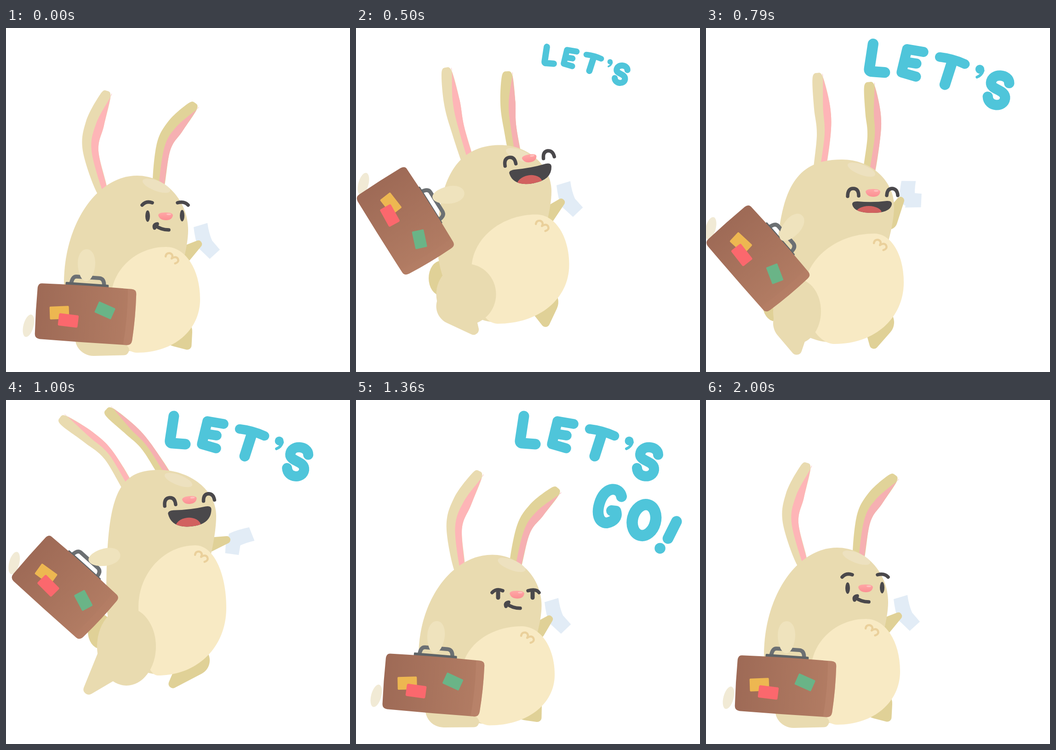
An HTML page for the animation above (2140 ms loop, 748 px wide and 748 px high).

```html
<!DOCTYPE html>
<html lang="en">
<head>
<meta charset="utf-8">
<title>Let's go!</title>
<style>
  html, body { margin: 0; width: 100%; height: 100%; overflow: hidden; background: #fff; }
  svg { display: block; width: 100vw; height: 100vh; }
  .line { fill: none; stroke: #4a484b; stroke-width: 7.5; stroke-linecap: round; stroke-linejoin: round; }
  .word { fill: none; stroke: #4fc5da; stroke-width: 23; stroke-linecap: round; stroke-linejoin: round; }
  .fur { fill: #e9dbb0; }
  .shade { fill: #e0d197; }
</style>
</head>
<body>
<svg viewBox="0 0 748 748" role="img" aria-label="Let's go!">
  <defs>
    <linearGradient id="leather"><stop stop-color="#9e6a56"/><stop offset="1" stop-color="#b37d64"/></linearGradient>
    <linearGradient id="snout" x2="0" y2="1"><stop stop-color="#ffa8a6"/><stop offset="1" stop-color="#fb8f93"/></linearGradient>
    <clipPath id="inMouth"><path id="mouthClip"/></clipPath>
  </defs>

  <g id="rabbit">
    <ellipse id="sock" rx="11" ry="25" fill="#f1ead5"/>
    <ellipse id="tail" class="shade" rx="27" ry="38"/>
    <path id="farLeg" class="shade"/>
    <g id="paper" fill="#e2ecf6">
      <path id="upperFlap" d="M-10 -37L20 -46Q23 -24 30 -8L14 12L0 8Q-7 -10 -10 -37Z"/>
      <path id="lowerFlap" d="M0 8L29 -9L47 12L25 32Z"/>
    </g>
    <path id="farArm" class="shade"/>
    <path id="farEar" fill="#e1d399"/><path id="farPink" fill="#f6b0b2"/>
    <path id="nearEar" class="fur"/><path id="nearPink" fill="#feb5b7"/>
    <path id="body" class="fur"/>
    <ellipse id="shine" rx="32" ry="11" fill="#f0e5c8" opacity=".65"/>
    <path id="belly" fill="#f8eac4"/>
    <path id="tuft" class="line" style="stroke:#ead09b;stroke-width:4.5"
      d="M-13 -6Q-10 -14 -2 -11Q5 -6 -1 1Q9 -3 12 4Q14 12 4 13"/>
    <ellipse id="thigh" class="fur"/>
    <path id="nearLeg" class="fur"/>

    <g id="face">
      <g id="open">
        <path class="line" d="M-51 -24Q-42 -34 -29 -29M26 -29Q41 -33 49 -24"/>
        <g fill="#4a484b"><ellipse cx="-39" rx="5" ry="12.5"/><ellipse cx="36" cy="-1" rx="5" ry="12.5"/></g>
      </g>
      <g id="half">
        <path class="line" d="M-54 -4Q-45 -14 -31 -8M24 -8Q42 -13 48 -4"/>
        <path class="line" style="stroke-width:9" d="M-41 -4V7M34 -4V7"/>
      </g>
      <path id="shut" class="line" d="M-52 -14Q-53 4 -39 4Q-26 4 -26 -13M27 -4Q27 13 39 13Q52 13 52 -1"/>
      <path id="happy" class="line" d="M-55 8Q-55 -9 -43 -9Q-31 -9 -31 7M30 6Q31 -9 42 -9Q53 -8 54 6"/>
      <path id="smile" class="line" d="M-24 26Q-27 18 -18 17M-23 20Q-10 30 7 30"/>
      <g id="laugh">
        <path id="mouth" fill="#4a484b"/>
        <ellipse id="tongue" cx="-9" rx="28" fill="#d1615f" clip-path="url(#inMouth)"/>
      </g>
      <path fill="url(#snout)" d="M-16 -2Q-15 -8 0 -8Q15 -8 16 -2Q14 9 1 9Q-13 9 -16 -2Z"/>
      <ellipse cx="7" cy="-4" rx="5" ry="1.8" fill="#ffc0be"/>
    </g>

    <g id="suitcase">
      <path fill="none" stroke="#6c7073" stroke-width="8.5" d="M-36 -62Q-35 -80 -25 -80H24Q36 -80 36 -62"/>
      <rect x="-48" y="-67" width="94" height="8" rx="2" fill="#5f6467"/>
      <g id="shell">
        <path fill="url(#leather)" d="M-99 -60Q0 -63 96 -61Q107 -61 107 -50Q109 0 105 50Q104 61 94 61Q0 62 -96 61Q-107 60 -107 50Q-109 0 -108 -50Q-107 -60 -99 -60Z"/>
        <path id="strip" fill="#c08a70" d="M88 -61H96Q107 -61 107 -50Q109 0 105 50Q104 61 94 61H86Q92 0 88 -61Z"/>
      </g>
      <g id="stickers">
        <rect x="-78" y="-13" width="42" height="28" rx="2" fill="#edb751" transform="rotate(-6 -57 1)"/>
        <rect x="-58" y="3" width="43" height="27" rx="3" fill="#fb686d" transform="rotate(3 -36 16)"/>
        <rect x="22" y="-24" width="39" height="26" rx="2" fill="#6ab487" transform="rotate(20 41 -11)"/>
      </g>
    </g>
    <path id="arm" fill="#efe3bd" d="M0 -35C13 -35 19 -19 19 -5C19 14 11 35 0 35S-19 14 -19 -5C-19 -19 -13 -35 0 -35Z"/>
  </g>

  <g id="lets" class="word">
    <path d="M365 35L357 88Q356 94 363 94L390 96"/>
    <path d="M473 52L438 46L426 96L457 105M432 73L458 77" stroke-width="21.5"/>
    <path d="M508 63Q535 66 562 78" stroke-width="20.5"/><path d="M535 72L519 122"/>
    <path d="M594 89v.1" stroke-width="19"/><path d="M601 92Q598 102 588 106" stroke-width="6"/>
    <path d="M657 119C657 99 620 96 618 118C617 134 650 132 648 152C645 172 612 170 611 148" stroke-width="22"/>
  </g>
  <g id="go" class="word">
    <path d="M578 211C574 190 545 188 533 220C522 250 532 268 547 267C562 264 570 255 566 242L557 241"/>
    <ellipse cx="626" cy="261" rx="24.5" ry="33.5" stroke-width="24" transform="rotate(15 626 261)"/>
    <path d="M695 264L677 300"/><path d="M660 321v.1"/>
  </g>
</svg>

<script>
const FPS = 14, LOOP = 2140;
const $ = id => document.getElementById(id);

// head, belly: extreme points of the outline (top, right, bottom, left).
// ears: bend x y, lower angle, upper angle. legs: joint and toe. farArm: shoulder and hand.
const poses = {
  rest: {
    head: [285, 321, 396, 440, 126, 555], belly: [348, 476, 422, 590, 285, 706, 228, 590], square: [.55],
    nearEar: [184, 267, -16, 15], farEar: [342, 261, 7, 35], earWidth: [1],
    thigh: [200, 647, 50, 50], toe: [256, 700], farLeg: [372, 660, 394, 690], tail: [170, 640],
    farArm: [386, 493, 418, 470], flaps: [0, 0],
    arm: [175, 516, 1], suitcase: [173, 622, 4, 1], face: [347, 409, 0, 44]
  },
  squat: {
    head: [308, 352, 411, 455, 146, 560], belly: [372, 508, 442, 605, 295, 709, 232, 600], square: [.55],
    nearEar: [243, 289, 1, 32], farEar: [384, 308, 17, 43], earWidth: [1],
    thigh: [219, 645, 68, 57], toe: [256, 700], farLeg: [370, 667, 394, 691], tail: [170, 630],
    farArm: [400, 512, 422, 483], flaps: [0, -3],
    arm: [155, 511, 64], suitcase: [136, 602, 10.4, 1], face: [359, 464, 0, 44]
  },
  leap: {
    head: [320, 177, 439, 276, 208, 400], belly: [412, 323, 485, 445, 320, 597, 270, 470], square: [.8],
    nearEar: [199, 168, -36, -54], farEar: [285, 140, -38, -49], earWidth: [.74],
    thigh: [260, 533, 62, 76], toe: [255, 631], farLeg: [444, 545, 430, 610], tail: [200, 478],
    farArm: [428, 326, 470, 295], flaps: [0, 0],
    arm: [204, 364, 82], suitcase: [103, 406, 64.7, .955], face: [383, 236, -13, 59]
  },
  land: {
    head: [296, 286, 409, 388, 152, 570], belly: [366, 447, 430, 553, 280, 687, 213, 575], square: [.75],
    nearEar: [256, 232, 7, -6], farEar: [365, 237, 8, -5], earWidth: [.88],
    thigh: [198, 616, 52, 70], toe: [197, 699], farLeg: [376, 640, 365, 688], tail: [150, 600],
    farArm: [398, 420, 423, 375], flaps: [17, -45],
    arm: [186, 434, 40], suitcase: [113, 502, 49, .965], face: [363, 358, 0, 44]
  },
  hop: {
    head: [333, 152, 457, 252, 218, 430], belly: [412, 316, 479, 452, 330, 599, 288, 450], square: [.8],
    nearEar: [224, 121, -31, -52], farEar: [306, 102, -33, -47], earWidth: [.72],
    thigh: [262, 536, 64, 85], toe: [180, 629], farLeg: [410, 566, 363, 617], tail: [205, 503],
    farArm: [430, 318, 480, 304], flaps: [85, 50],
    arm: [214, 342, 79], suitcase: [128, 408, 42, .965], face: [399, 217, -6, 58]
  }
};

// Step, pose, lift above it.
const keys = [
  [0, 'rest', 0], [2, 'rest', 0], [5, 'squat', 0], [6, 'squat', 0], [8, 'leap', 20], [9, 'leap', 0],
  [11, 'land', 0], [13, 'hop', 6], [14, 'hop', 0], [16, 'land', 0], [17, 'squat', 0], [21, 'rest', 0], [30, 'rest', 0]
];
const eyeKeys = [[0, 'open'], [4, 'half'], [5, 'shut'], [7, 'happy'], [18, 'shut'], [19, 'half'], [21, 'open']];

const lerp = (a, b, t) => a + (b - a) * t;
const smooth = t => t * t * (3 - 2 * t);
const easeOut = power => t => 1 - (1 - t) ** power;
const easing = { face: easeOut(2), suitcase: easeOut(3), arm: easeOut(4) };
const rad = degrees => degrees * Math.PI / 180;
const set = (id, attrs) => { for (const name in attrs) $(id).setAttribute(name, attrs[name]); };
const show = (id, on) => set(id, { display: on ? 'inline' : 'none' });
const place = (id, x, y, angle) => set(id, { transform: `translate(${x} ${y}) rotate(${angle})` });

// Closed curve through four extreme points; tension is given per quarter, clockwise from the top.
function oval([tx, ty, rx, ry, bx, by, lx, ly], [tr, rb, bl, lt]) {
  return `M${tx} ${ty}C${lerp(tx, rx, tr)} ${ty} ${rx} ${lerp(ry, ty, tr)} ${rx} ${ry}`
    + `C${rx} ${lerp(ry, by, rb)} ${lerp(bx, rx, rb)} ${by} ${bx} ${by}`
    + `C${lerp(bx, lx, bl)} ${by} ${lx} ${lerp(ly, by, bl)} ${lx} ${ly}`
    + `C${lx} ${lerp(ly, ty, lt)} ${lerp(tx, lx, lt)} ${ty} ${tx} ${ty}Z`;
}

// Hull of a big and a small circle.
function limb([x0, y0, x1, y1], big, small) {
  const along = Math.atan2(y1 - y0, x1 - x0);
  const spread = Math.acos(Math.min(1, (big - small) / Math.hypot(x1 - x0, y1 - y0)));
  const on = (x, y, r, side) => {
    const angle = along + side * spread;
    return `${x + r * Math.cos(angle)} ${y + r * Math.sin(angle)}`;
  };
  return `M${on(x0, y0, big, -1)}L${on(x1, y1, small, -1)}A${small} ${small} 0 0 1 ${on(x1, y1, small, 1)}`
    + `L${on(x0, y0, big, 1)}A${big} ${big} 0 1 1 ${on(x0, y0, big, -1)}Z`;
}

// Closed smooth curve; a doubled point makes a corner.
function blob(points) {
  const n = points.length, at = i => points[(i + n) % n];
  const handle = (i, side) => [0, 1].map(axis => at(i)[axis] + side * (at(i + 1)[axis] - at(i - 1)[axis]) / 6);
  return `M${points[0]}` + points.map((_, i) => `C${handle(i, 1)} ${handle(i + 1, -1)} ${at(i + 1)}`).join('') + 'Z';
}

function drawEar(side, [x, y, lower, upper], width, length) {
  const bulge = (lower - upper) * .2;
  const station = (angle, distance, half, shift = 0) => edge => {
    const across = shift + edge * half, a = rad(angle);
    return [x + distance * Math.sin(a) + across * Math.cos(a), y - distance * Math.cos(a) + across * Math.sin(a)];
  };
  const stations = [
    station(lower, -95, 11), station((lower + upper) / 2, 0, 17 * width),
    station(upper, length * .44, 20 * width, bulge), station(upper, length * .92, 11.5)
  ];
  const left = stations.map(at => at(-1)), right = stations.map(at => at(1)).reverse();
  const inner = stations.slice(0, 3).map(at => at(.12));
  set(side + 'Ear', { d: blob([...left, station(upper, length, 0)(0), ...right]) });
  set(side + 'Pink', { d: blob([...inner, right[0], ...right]) });
}

function poseAt(step) {
  const next = keys.findIndex(key => key[0] > step);
  const [[from, a, liftA], [to, b, liftB]] = [keys[next - 1], keys[next]];
  const t = (step - from) / (to - from), pose = {};
  for (const part in poses[a]) {
    const eased = (easing[part] || smooth)(t);
    pose[part] = poses[a][part].map((v, i) => lerp(v, poses[b][part][i], eased));
  }
  return { pose, lift: lerp(liftA, liftB, smooth(t)) };
}

function drawBody({ head, belly, square, thigh, toe, farLeg, tail }) {
  const [topX, topY, rightX, rightY, leftX, leftY] = head, [bellyX, bellyY, , , bottomX, bottomY] = belly;
  set('body', { d: oval([topX, topY, rightX, rightY, bottomX, bottomY - 3, leftX, leftY], [.55, .3, .55, square[0]]) });
  set('belly', { d: oval(belly, [.57, .58, .55, .55]) });
  place('shine', topX + 42, topY + 22, 21);
  place('tuft', bellyX + 13, bellyY + 24, -12);
  const [cx, cy, rx, ry] = thigh;
  set('thigh', { cx, cy, rx, ry });
  set('nearLeg', { d: limb([cx - rx + 40, cy + 26, ...toe], 40, 11.5) });
  set('farLeg', { d: limb(farLeg, 33, 9.5) });
  place('tail', ...tail, 0);
}

function drawArms({ farArm, flaps, arm, suitcase }) {
  set('farArm', { d: limb(farArm, 18, 8) });
  place('paper', farArm[2], farArm[3], 0);
  ['upperFlap', 'lowerFlap'].forEach((id, i) => set(id, { transform: `rotate(${flaps[i]} 14 0)` }));
  place('arm', ...arm);

  const [x, y, angle, stretch] = suitcase, slack = 1 - stretch, a = rad(angle), reach = -122 * stretch;
  place('suitcase', x, y, angle);
  set('shell', { transform: `scale(${stretch} ${1 + 1.5 * slack})` });
  set('stickers', { transform: `translate(${200 * slack} ${130 * slack})` });
  set('strip', { opacity: .4 * Math.max(0, 1 - slack / .045) });
  place('sock', x + reach * Math.cos(a) - 34 * Math.sin(a), y + reach * Math.sin(a) + 34 * Math.cos(a), 15);
}

function drawFace([x, y, tilt, depth], eyes) {
  const laughing = eyes === 'happy', wide = 1 + (depth - 44) / 140;
  for (const id of ['open', 'half', 'shut', 'happy']) show(id, id === eyes);
  show('laugh', laughing);
  show('smile', !laughing);
  place('smile', 0, eyes === 'shut' ? -6 : 0, 0);
  place('face', x, y, tilt);
  const w = v => v * wide;
  const d = `M${w(-45)} 26Q${w(-46)} 19 ${w(-34)} 19Q0 22 ${w(30)} 18Q${w(42)} 17 ${w(41)} 26`
    + `Q${w(37)} ${depth} ${w(-1)} ${depth}Q${w(-41)} ${depth} ${w(-45)} 26Z`;
  set('mouth', { d });
  set('mouthClip', { d });
  set('tongue', { cy: depth, ry: depth * .34 });
}

// Words pop in past full size, settle, and shrink away at the end.
function drawWord(id, age, overshoot, leaving, x, y) {
  const grown = age > 0 ? 1 + overshoot * .45 ** (age - 1) : .6;
  show(id, age >= 0 && leaving < 1);
  set(id, { transform: `translate(${x} ${y}) scale(${grown * (1 - leaving ** 2)}) translate(${-x} ${-y})` });
}

function draw(step) {
  const { pose, lift } = poseAt(step);
  const leaving = Math.min(1, Math.max(0, (step - 24) / 4));
  const sway = 2 * Math.sin(Math.PI * leaving);
  place('rabbit', 0, -lift, 0);
  for (const ear of ['nearEar', 'farEar']) pose[ear][3] += sway;
  drawEar('near', pose.nearEar, pose.earWidth[0], 135);
  drawEar('far', pose.farEar, pose.earWidth[0] * .94, 120);
  drawBody(pose);
  drawArms(pose);
  drawFace(pose.face, eyeKeys.filter(key => key[0] <= step).at(-1)[1]);
  drawWord('lets', step - 7, .15, leaving, 490, 50);
  drawWord('go', step - 15, .24, leaving, 612, 258);
}

function tick() {
  const time = performance.now() % LOOP;
  draw(Math.floor((time + 5) * FPS / 1000));
  requestAnimationFrame(tick);
}
tick();
</script>
</body>
</html>
```
